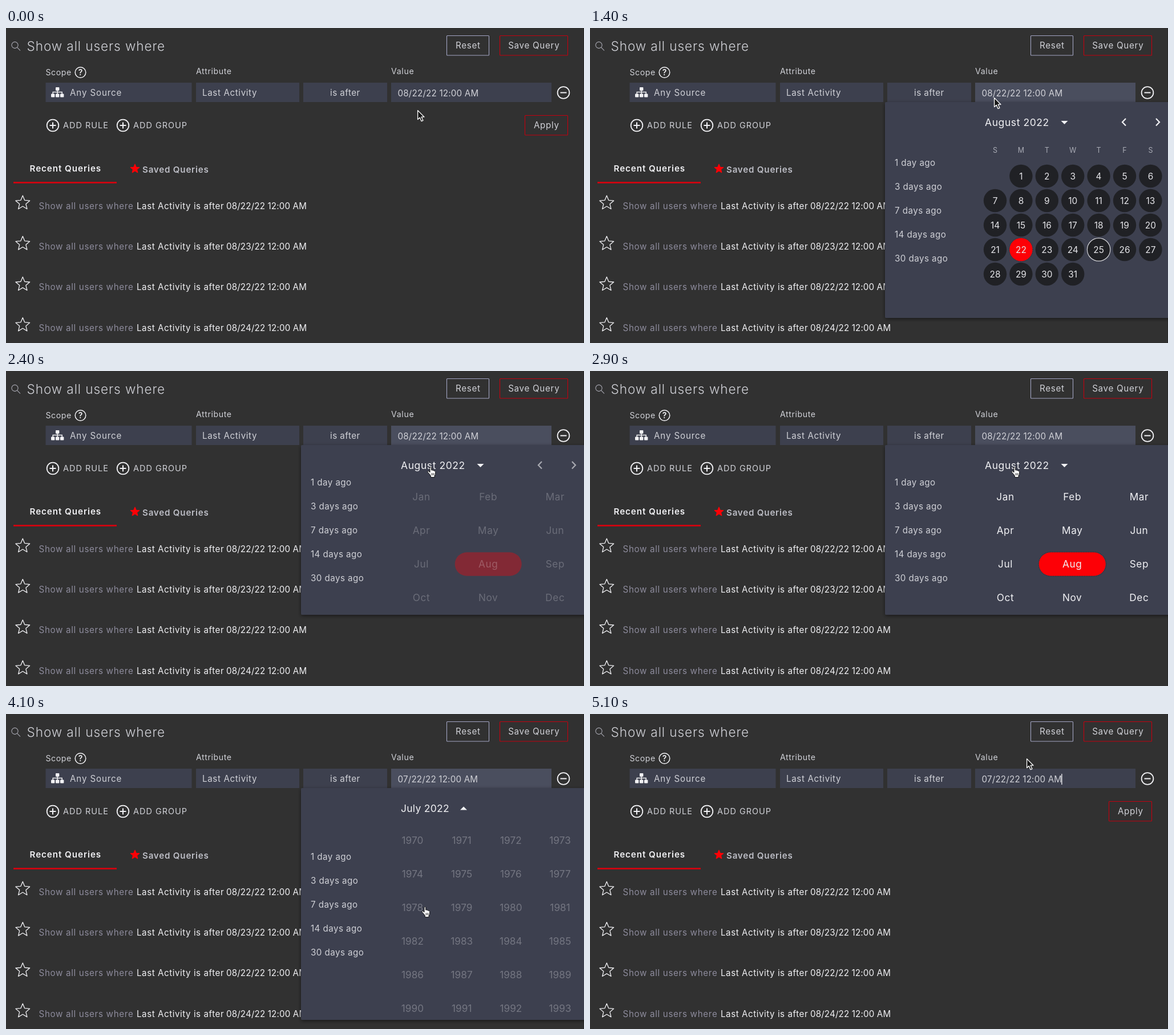
An HTML page for the animation above (7.1 s loop, 1013 by 553 pixels).

```html
<!DOCTYPE html>
<html lang="en">
<head>
<meta charset="utf-8">
<title>Query builder</title>
<style>
  html, body { margin: 0; width: 100%; height: 100%; overflow: hidden; background: #313131; }
  svg { display: block; width: 1013px; height: 553px; }
  text { font-family: Inter, "Open Sans", sans-serif; font-optical-sizing: none; white-space: pre; }
</style>
</head>
<body>
<svg id="stage" viewBox="0 0 1013 553">
  <defs>
    <filter id="shadow" x="-10%" y="-10%" width="120%" height="120%">
      <feDropShadow dx="0" dy="2" stdDeviation="3" flood-color="#000" flood-opacity=".5"/>
    </filter>
  </defs>
  <g id="page"></g>
  <g id="field"></g>
  <g id="panel"></g>
  <g id="pointer"></g>
</svg>
<script>
const LOOP = 7100;
const RED = '#fd0006', DARK_RED = '#c4000f', PANEL = '#3e414f';
const FIELD = '#3d404e', FIELD_HOVER = '#4a4e5e', SOFT = '#d0d1d7', WHITE = '#f1f1f4';
const MONTHS = 'Jan Feb Mar Apr May Jun Jul Aug Sep Oct Nov Dec'.split(' ');
const el = id => document.getElementById(id);

// Text whose capitals are centred on y; gap is letter spacing in em.
function text(x, y, size, str, { fill = SOFT, gap = .035, mid = false, weight = 400, op = 1 } = {}) {
  return `<text x="${x}" y="${y + size * .364}" font-size="${size}" fill="${fill}" opacity="${op}"
    letter-spacing="${gap}em" font-weight="${weight}" text-anchor="${mid ? 'middle' : 'start'}">${str}</text>`;
}
function box(x, y, w, h, fill, stroke = 'none', rx = 0, extra = '') {
  return `<rect x="${x}" y="${y}" width="${w}" height="${h}" rx="${rx}" fill="${fill}" stroke="${stroke}" ${extra}/>`;
}
function ring(x, y, r, fill, stroke = 'none', w = 1, extra = '') {
  return `<circle cx="${x}" cy="${y}" r="${r}" fill="${fill}" stroke="${stroke}" stroke-width="${w}" ${extra}/>`;
}
function line(d, stroke, w, extra = '') {
  return `<path d="${d}" fill="none" stroke="${stroke}" stroke-width="${w}" ${extra}/>`;
}
function star(x, y, r, fill, stroke) {
  const pts = Array.from({ length: 10 }, (_, i) => {
    const a = Math.PI * (i / 5 - .5), k = i % 2 ? r * .45 : r;
    return (x + k * Math.cos(a)).toFixed(2) + ',' + (y + k * Math.sin(a)).toFixed(2);
  });
  return `<polygon points="${pts.join(' ')}" fill="${fill}" stroke="${stroke}" stroke-width="1.3" stroke-linejoin="round"/>`;
}
function button(x, y, w, h, label, stroke) {
  return box(x, y, w, h, 'none', stroke, 1, 'stroke-width="1.1"')
    + text(x + w / 2 + .3, y + h / 2, 15.2, label, { mid: true, gap: .045 });
}
function addButton(x, label) {
  return ring(x, 171, 10.3, 'none', WHITE, 1.8)
    + line(`M${x - 5.5} 171h11M${x} 165.5v11`, WHITE, 2)
    + text(x + 18, 171, 14.5, label, { gap: .067 });
}

function drawPage() {
  let s = ring(15.5, 30, 5.6, 'none', '#a9a9b2', 1.1) + line('M19.6 34.2l5.4 5.4', '#a9a9b2', 1.1);
  s += text(36.5, 31.5, 22.6, 'Show all users where', { gap: .04, weight: 350 });
  s += button(772.5, 13.5, 74, 34.5, 'Reset', '#a3a5c4');
  s += button(865.5, 13.5, 119, 34.5, 'Save Query', DARK_RED);
  s += button(909.5, 153.5, 75, 34.5, 'Apply', DARK_RED);
  s += text(69.5, 78, 14.2, 'Scope') + text(333, 76, 14.2, 'Attribute', { gap: .04 })
    + text(675, 76, 14.2, 'Value', { gap: .045 });
  s += ring(130.5, 78, 9.3, 'none', WHITE, 1.5)
    + text(130.5, 78, 14, '?', { mid: true, gap: 0, weight: 600, fill: WHITE });
  s += box(69.5, 96, 256, 34, FIELD) + box(333, 96, 181, 34, FIELD) + box(521, 96, 147, 34, FIELD);
  s += [[87, 104], [79, 115.5], [87, 115.5], [95, 115.5]]
    .map(([x, y]) => box(x, y, 6.4, 6, WHITE, 'none', 1)).join('');
  s += line('M90.2 109v7M82.2 116v-3.5h16v3.5', WHITE, 1.5);
  s += text(112, 113.5, 15.2, 'Any Source', { gap: .055 }) + text(344, 113.5, 15.2, 'Last Activity', { gap: .04 })
    + text(568, 113.5, 15.2, 'is after', { gap: .03 });
  s += ring(977, 113.5, 10.4, 'none', WHITE, 1.8) + line('M971.5 113.5h11', WHITE, 2);
  s += addButton(82, 'ADD RULE') + addButton(205, 'ADD GROUP');
  s += text(41.5, 246, 15.2, 'Recent Queries', { weight: 600, gap: .062, fill: WHITE });
  s += box(13, 270, 181, 2.8, '#d2000f');
  s += star(226, 247.2, 8, RED, RED);
  s += text(239, 248, 15.2, 'Saved Queries', { weight: 600, gap: .05, fill: '#bdbec6' });
  [22, 23, 22, 24].forEach((day, i) => {
    const y = 312 + 71.4 * i;
    s += star(29.3, y - 4.8, 13, 'none', WHITE);
    s += text(57.5, y, 15.2, 'Show all users where', { fill: '#8d8b9c', gap: .043 });
    s += text(229, y, 15.2, 'Last Activity is after', { fill: WHITE, gap: .035 });
    s += text(386, y, 15.2, `08/${day}/22 12:00 AM`, { fill: WHITE, gap: .009 });
  });
  return s + box(1012, 0, 1, 553, '#272727');
}

function drawField({ hover, month, caret }) {
  return box(675, 96, 281, 34, hover ? FIELD_HOVER : FIELD)
    + text(686.5, 114, 15.2, `${month}/22/22 12:00 AM`, { gap: .012 })
    + (caret ? box(826.2, 105, 1.3, 19, WHITE) : '');
}

function daysView() {
  let s = '';
  const col = i => 710 + 45.4 * i;
  [...'SMTWTFS'].forEach((d, i) => s += text(col(i), 214, 12.5, d, { mid: true, gap: 0, fill: '#a9abb5' }));
  for (let d = 1; d <= 31; d++) {
    const x = col(d % 7), y = 260 + 43 * Math.floor(d / 7);
    const picked = d === 22, today = d === 25;
    s += ring(x, y, 20.2, picked ? RED : '#202125', today ? '#d6d6da' : 'none', 1.2);
    if (picked) s += ring(x, y, 20.8, 'none', '#24252b', 1, 'stroke-dasharray="1 2"');
    s += text(x, y, 15.4, d, { mid: true, gap: 0, fill: '#e6e6ea' });
  }
  return s;
}

function monthsView(fade, hover) {
  let s = '';
  MONTHS.forEach((name, i) => {
    const x = 728 + 117.2 * (i % 3), y = 221 + 59 * Math.floor(i / 3);
    if (name === 'Aug') {
      s += box(x - 58.5, y - 20.7, 117, 41.4, RED, 'none', 20.7, `opacity="${fade < 1 ? .36 : 1}"`);
      if (fade === 1) s += box(x - 59, y - 21.2, 118.5, 42.4, 'none', '#202126', 21, 'stroke-dasharray="1 2"');
    }
    if (i === hover) s += box(x - 58.5, y - 20.7, 117, 41.4, '#4b4d59', 'none', 20.7);
    s += text(x, y, 17.2, name, { mid: true, gap: .035, fill: WHITE, op: fade });
  });
  return s;
}

function yearsView(fade) {
  let s = '';
  for (let i = 0; i < 24; i++)
    s += text(712.5 + 86.2 * (i % 4), 222 + 59 * Math.floor(i / 4), 17.2, 1970 + i,
      { mid: true, gap: .003, fill: WHITE, op: fade });
  return s;
}

const VIEWS = {
  days: { bottom: 509, list: 236, draw: daysView },
  months: { bottom: 428, list: 195, draw: monthsView },
  years: { bottom: 537, list: 250, draw: yearsView }
};

function drawPanel({ view, fade = 1, open = 1, hoverMonth }) {
  if (!view) return '';
  const v = VIEWS[view], years = view === 'years';
  let s = box(517, 130, 510, v.bottom - 130, PANEL, 'none', 2, 'filter="url(#shadow)"');
  s += text(692, 165.5, 17.5, years ? 'July 2022' : 'August 2022', { fill: WHITE, gap: years ? .015 : .033 });
  s += `<path d="${years ? 'M796 168.5h12l-6-6z' : 'M825.5 163h12l-6 6z'}" fill="${WHITE}"/>`;
  const arrows = view === 'days' ? 1 : view === 'months' && fade < 1 ? .6 : 0;
  if (arrows) s += line('M939 159l-6 6.3l6 6.3M992 159l6 6.3l-6 6.3', WHITE, 2.2, `opacity="${arrows}"`);
  ['1 day', '3 days', '7 days', '14 days', '30 days'].forEach((n, i) =>
    s += text(534, v.list + 42 * i, 15.2, n + ' ago', { gap: .028 }));
  s += v.draw(fade, hoverMonth);
  const squash = open < 1 ? 'transform="translate(0 130) scale(1 .81) translate(0 -130)"' : '';
  return `<g opacity="${open}" ${squash}>${s}</g>`;
}

function drawPointer({ x, y, hand }) {
  const shape = hand
    ? `<path d="M4.6 13.4L1.2 9.6C.2 8.3 1.8 7 3 8.1L5 10V1.9C5 .1 7.7.1 7.7 1.9V6.2
        C8.4 5.4 10 5.7 10.2 6.8C11 6.2 12.4 6.6 12.5 7.7C13.4 7.3 14.8 7.9 14.7 9.2
        L14.4 13.6L13 16.2V18.6H6.4V16.2Z" fill="#fff" stroke="#111" stroke-width="1"/>
       <path d="M8 11.2v4M10 11.2v4M12 11.2v4" stroke="#111" stroke-width=".8"/>`
    : `<path d="M.6.6V16.6L4.3 13.2L7 19.6L9.9 18.3L7.2 12.2H12Z" fill="#161616" stroke="#fff" stroke-width="1.3" stroke-linejoin="round"/>`;
  return `<g transform="translate(${x} ${y})">${shape}</g>`;
}

// Each step changes only the listed properties; the picture holds until the next one.
const STEPS = [
  { t: 0, x: 721, y: 144, hand: false, month: '08', hover: false, view: '', caret: false },
  { t: 500, x: 714, y: 132 },
  { t: 700, x: 708, y: 122, hover: true },
  { t: 1200, view: 'days', open: .02 },
  { t: 1400, open: 1 },
  { t: 1900, x: 738, y: 168, hand: true },
  { t: 2400, view: 'months', fade: .25 },
  { t: 2900, fade: 1 },
  { t: 3400, x: 733, y: 258 },
  { t: 3600, x: 728, y: 338, hoverMonth: 6 },
  { t: 4100, month: '07', view: 'years', fade: .3 },
  { t: 4300, fade: 1, x: 740, y: 250 },
  { t: 4500, x: 757, y: 140, hand: false },
  { t: 4700, x: 765, y: 78 },
  { t: 4900, view: '', hover: false },
  { t: 5100, caret: true }
];

let shown = -1;
function render(ms) {
  const t = ms % LOOP;
  const n = STEPS.filter(s => s.t <= t).length;
  if (n === shown) return;
  shown = n;
  const state = Object.assign({}, ...STEPS.slice(0, n));
  el('field').innerHTML = drawField(state);
  el('panel').innerHTML = drawPanel(state);
  el('pointer').innerHTML = drawPointer(state);
}

el('page').innerHTML = drawPage();
const start = performance.now();
function tick() {
  render(performance.now() - start);
  requestAnimationFrame(tick);
}
tick();
</script>
</body>
</html>
```
